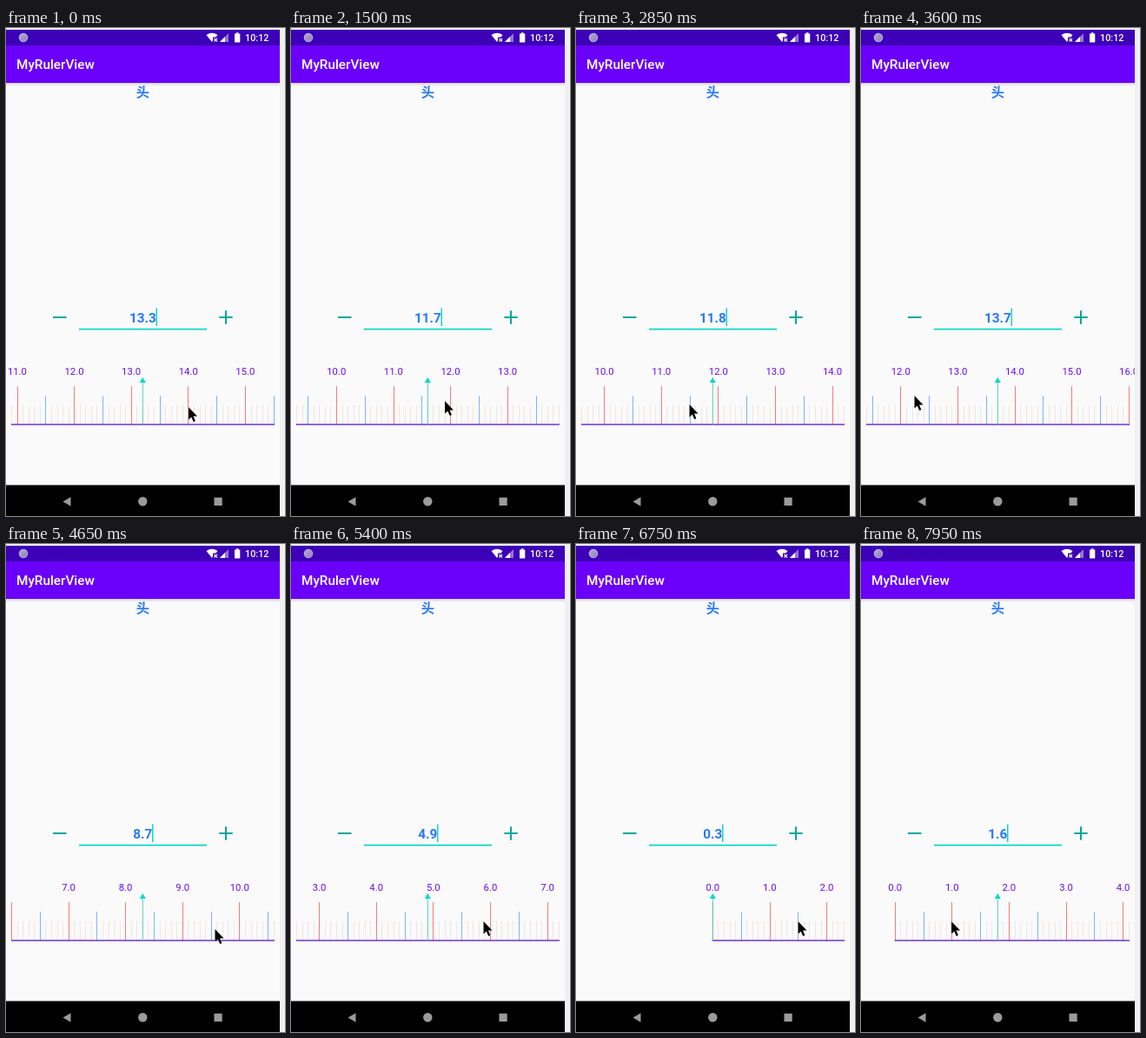
Recreate the animation shown at these times as an HTML page. Size 321 px wide and 560 px high, loop 8000 ms.

```html
<!DOCTYPE html>
<html lang="en">
<head>
<meta charset="utf-8">
<title>Ruler view</title>
<style>
  html, body { margin: 0; width: 100%; height: 100%; overflow: hidden; background: #f0f0f0; }
  svg { display: block; width: 321px; height: 560px; font-family: Roboto, "Noto Sans", sans-serif; }
  .mid { text-anchor: middle; }
  .crisp { shape-rendering: crispEdges; }
  #labels { font-size: 11.3px; fill: #6a0df0; text-anchor: middle; }
  .value { font-size: 15.3px; font-weight: 700; fill: #2979f2; }
</style>
</head>
<body>
<svg viewBox="0 0 321 560">
  <defs>
    <linearGradient id="shade" x2="0" y2="1">
      <stop stop-color="#000" stop-opacity=".15"/>
      <stop offset="1" stop-color="#000" stop-opacity="0"/>
    </linearGradient>
    <linearGradient id="ball" x2="1" y2="1">
      <stop stop-color="#b5abd6"/>
      <stop offset="1" stop-color="#8a7fb4"/>
    </linearGradient>
    <clipPath id="screen"><path d="M0 0H315V560H0z"/></clipPath>
  </defs>

  <rect y="2" width="315" height="558" fill="#fafafa"/>
  <rect y="63" width="315" height="4" fill="url(#shade)"/>
  <rect y="20" width="315" height="43" fill="#6a00fa"/>
  <rect y="2" width="315" height="18" fill="#3c00b6"/>
  <rect y="524.5" width="315" height="35.5" fill="#000"/>

  <!-- status bar -->
  <circle cx="20" cy="11" r="4.800" fill="url(#ball)" stroke="#c9c1e6" stroke-width=".9"/>
  <g fill="#fff">
    <path d="M230.500 8Q237 3.500 243.500 8L241.500 10.500H238V14L237 16z"/>
    <path d="M239.500 12l3.500 3.500m0-3.500l-3.500 3.500" stroke="#fff" stroke-width="1.1"/>
    <path d="M256 6V16H246z" opacity=".45"/>
    <path d="M252 10V16H246z"/>
    <path d="M263 6.500h1.800V5.300h2.700v1.200h1.800V16.500H263z"/>
    <text x="275" y="15" font-size="10.8" font-weight="500">10:12</text>
    <text x="12" y="46.800" font-size="15.3" font-weight="500">MyRulerView</text>
  </g>

  <!-- navigation bar -->
  <g fill="#9b9b9b">
    <path d="M65.500 543.500L74.500 538.200V548.800z"/>
    <circle cx="157.300" cy="543.300" r="5.200"/>
    <rect x="239.500" y="538.800" width="9.200" height="9.200"/>
  </g>

  <text class="value mid" x="157.300" y="78.500" style="font-family:'Noto Sans CJK SC','Noto Sans CJK',sans-serif">头</text>

  <!-- number field -->
  <path d="M54 332H69.500M245.300 332H260.700M253 324.300V339.700" stroke="#08a79c" stroke-width="2"/>
  <path d="M84 345.600H231" stroke="#0fd8c7" stroke-width="1.600"/>
  <text id="value" class="value mid" x="157.300" y="337.500"></text>
  <rect id="caret" y="321.500" width="1.500" height="20.500" fill="#0fd8c7"/>

  <!-- ruler -->
  <g clip-path="url(#screen)">
    <g class="crisp">
      <path id="minor" fill="#f3e4e4"/>
      <path id="half" fill="#7fb4fb"/>
      <path id="major" fill="#fb7a7a"/>
    </g>
    <path id="base" stroke="#6f35c4" stroke-width="1.600"/>
    <g id="labels"></g>
  </g>
  <path d="M157.300 406V455" stroke="#55cfb4"/>
  <path d="M157.300 400.800L160.900 407H153.700z" fill="#0fd8c7"/>

  <path id="mouse" d="M.5 1V15.500l3.300-3.100 2.400 5.600 2.200-1-2.400-5.400h4.500z"
        stroke="#fff" stroke-width=".8" stroke-linejoin="round" paint-order="stroke"/>
</svg>
<script>
const LOOP = 8000, STEP = 150, LAG = 40, BLINK = 600;
const CENTER = 157.25, UNIT = 65.6, LEFT = 6, RIGHT = 309;

const linear = p => p;
const settle = p => 1 - (1 - p) ** 2;
const speedUp = p => p ** 1.5;

// each key: time, values, and the easing that leads to it
const key = (t, values, ease = linear) => ({ t, values, ease });

const scroll = [
  key(-150, [13.4]), key(450, [13], settle),
  key(1350, [13]), key(1500, [11.6], settle), key(2100, [10], settle),
  key(2400, [10]), key(2850, [11.93]), key(3600, [13.7], settle),
  key(4200, [13.7]), key(5400, [4.9], settle),
  key(5700, [4.9]), key(6750, [0], speedUp),
  key(7650, [0]), key(7950, [1.8])
];

const mouse = [
  key(0, [209.5, 434]), key(450, [246, 438], settle),
  key(600, [246, 438]), key(1200, [71, 424]),
  key(1350, [71, 424]), key(1500, [176.5, 427]), key(2100, [262, 434], settle),
  key(2400, [258, 434]), key(2850, [130, 431]), key(3450, [61, 421], settle),
  key(3900, [61, 421]), key(4200, [74, 434]), key(4650, [240, 441]),
  key(5100, [246, 441]), key(5400, [221, 432]), key(5700, [88, 430]),
  key(6750, [255, 432], settle), key(7050, [268, 432]),
  key(7200, [268, 432]), key(7650, [222, 433], speedUp), key(7950, [103.5, 432])
];

const $ = id => document.getElementById(id);

function at(keys, t) {
  const i = keys.findIndex(k => k.t >= t);
  if (i < 0) return keys[keys.length - 1].values;
  if (i === 0) return keys[0].values;
  const a = keys[i - 1], b = keys[i], p = b.ease((t - a.t) / (b.t - a.t));
  return a.values.map((v, j) => v + (b.values[j] - v) * p);
}

const tenths = t => Math.round(at(scroll, t)[0] * 10 + 1e-6);
const reading = t => (tenths(t - LAG) / 10).toFixed(1);

// the caret restarts its blink whenever the reading changes
function caretShown(t) {
  let since = t;
  while (since > -STEP && reading(since) === reading(since - STEP)) since -= STEP;
  return (t - since) % (2 * BLINK) < BLINK;
}

const show = (el, on) => el.setAttribute("visibility", on ? "visible" : "hidden");

const labels = Array.from({ length: 18 }, (_, n) => {
  const el = document.createElementNS("http://www.w3.org/2000/svg", "text");
  el.textContent = n.toFixed(1);
  el.setAttribute("y", 398);
  return $("labels").appendChild(el);
});

function drawRuler(now) {
  const tops = { major: 411, half: 422, minor: 433 };
  const paths = { major: "", half: "", minor: "" };
  const xOf = n => CENTER + (n - now) / 10 * UNIT;
  for (let n = Math.max(0, now - 24); n <= now + 24; n++) {
    const x = xOf(n);
    if (x < LEFT || x > RIGHT) continue;
    const kind = n % 10 === 0 ? "major" : n % 5 === 0 ? "half" : "minor";
    paths[kind] += `M${Math.floor(x + 0.15)} ${tops[kind]}h1V455h-1z`;
  }
  for (const kind in paths) $(kind).setAttribute("d", paths[kind]);
  $("base").setAttribute("d", `M${Math.max(LEFT, xOf(0) - 0.5)} 455H${RIGHT}`);
  labels.forEach((el, n) => {
    const x = xOf(n * 10);
    el.setAttribute("x", x);
    show(el, x > LEFT + 0.5 && x < RIGHT);
  });
}

function draw(t) {
  drawRuler(tenths(t));
  const text = reading(t);
  $("value").textContent = text;
  $("caret").setAttribute("x", text.length > 3 ? 172.5 : 168);
  show($("caret"), caretShown(t));
  $("mouse").setAttribute("transform", `translate(${at(mouse, t)})`);
}

let start = null, shown = -1;
function tick(time) {
  if (start === null) start = time;
  const t = Math.floor((time - start) % LOOP / STEP) * STEP;
  if (t !== shown) draw(shown = t);
  requestAnimationFrame(tick);
}
draw(0);
requestAnimationFrame(tick);
</script>
</body>
</html>
```
